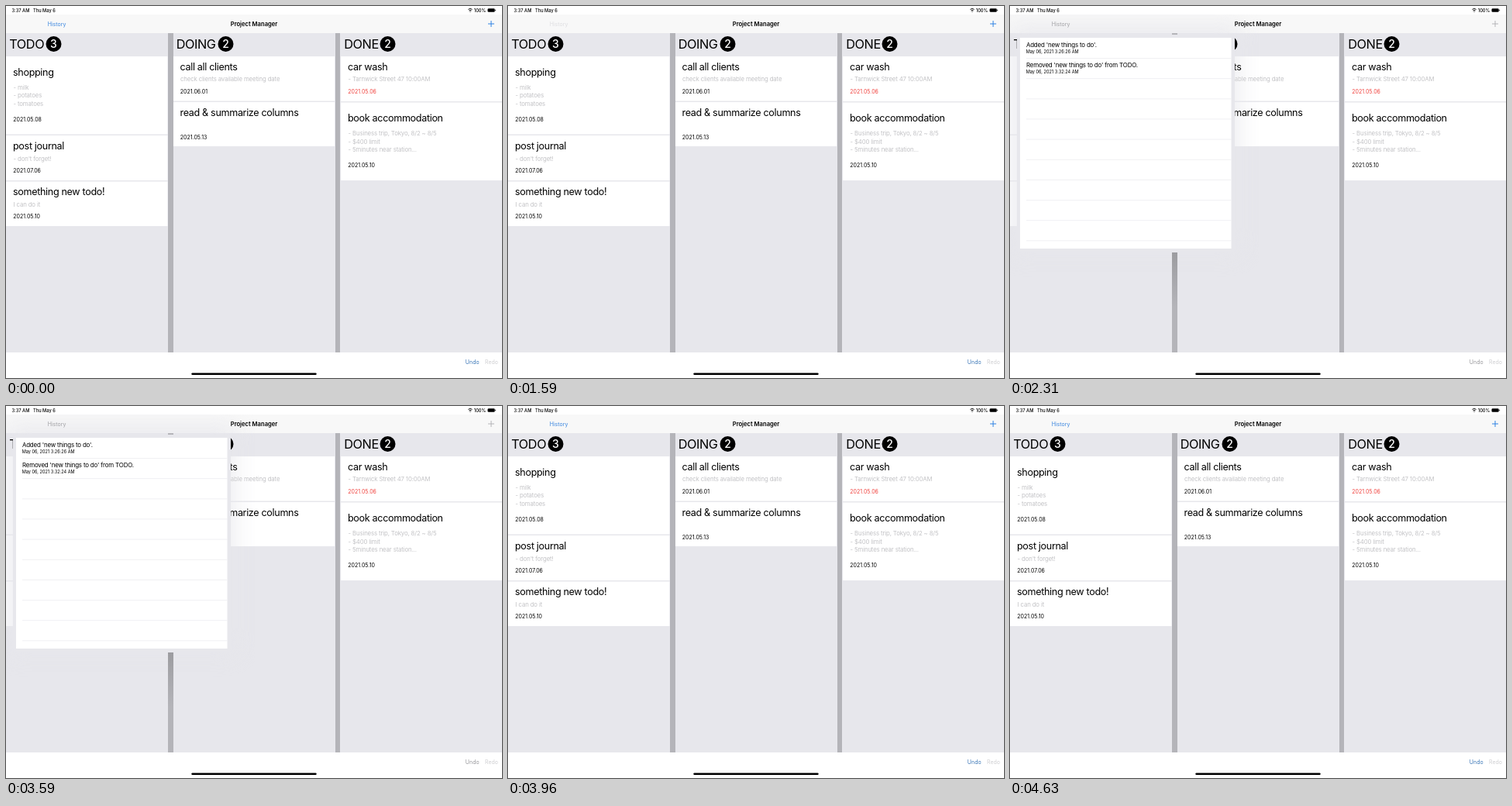
Recreate the animation shown at these times as an HTML page. Size 640 by 480 pixels, loop 5000 ms.

```html
<!DOCTYPE html>
<html lang="en">
<head>
<meta charset="utf-8">
<title>Project Manager</title>
<style>
  html, body { margin: 0; width: 100%; height: 100%; overflow: hidden; background: #fff; }
  svg { display: block; width: 640px; height: 480px; font-family: Inter, Roboto, sans-serif; }
  .head { font-size: 16.3px; letter-spacing: -.45px; }
  .count { font-size: 14px; font-weight: 500; fill: #fff; text-anchor: middle; }
  .title { font-size: 12.6px; letter-spacing: -.34px; }
  .note { font-size: 7.8px; letter-spacing: -.14px; fill: #c3c3c6; }
  .small { font-size: 7px; }
  .bar { font-size: 7.6px; font-weight: 600; text-anchor: middle; }
  .status { font-size: 5.7px; font-weight: 500; }
  .entry { font-size: 7.9px; letter-spacing: -.16px; }
  .stamp { font-size: 5.6px; }
  .shade { mix-blend-mode: darken; }
</style>
</head>
<body>
<svg id="stage" viewBox="0 0 640 480">
  <defs>
    <filter id="blur" x="-20%" y="-20%" width="140%" height="140%" color-interpolation-filters="sRGB">
      <feGaussianBlur stdDeviation="14"/>
    </filter>
    <linearGradient id="fade" x2="0" y2="1">
      <stop stop-color="#9c9ca0"/>
      <stop offset="1" stop-color="#b4b4b9"/>
    </linearGradient>
    <clipPath id="below"><path d="M0 11H640V447H0Z"/></clipPath>
  </defs>
  <path d="M0 0H640V480H0Z" fill="#fff"/>
  <path d="M0 11H640V35H0Z" fill="#f8f8f8"/>
  <path d="M0 35H640V447H0Z" fill="#e7e7ec"/>
  <g id="board"></g>
  <path d="M209 35h7V447h-7ZM425 35h6V447h-6Z" fill="#b4b4b9"/>
  <g id="popover">
    <g class="shade" clip-path="url(#below)">
      <rect x="0" y="24" width="296" height="294" fill="#e7e7ec" opacity=".75" filter="url(#blur)"/>
    </g>
    <path d="M209 318h7v70h-7Z" fill="url(#fade)"/>
    <g id="panel">
      <rect x="9" y="37" width="281" height="281" rx="5" fill="#e7e7ec"/>
      <path d="M13 41H285.5V313H13Z" fill="#fff"/>
    </g>
  </g>
  <g id="chrome">
    <path d="M596.4 4.4Q599 2.2 601.6 4.4M597.5 5.9Q599 4.7 600.5 5.9" fill="none" stroke="#000" stroke-width=".9"/>
    <circle cx="599" cy="7.1" r=".7"/>
    <rect x="621.5" y="3.2" width="9.2" height="4.6" rx="1.3"/>
    <path d="M631.3 4.7h.8v1.6h-.8Z"/>
    <path id="plus" d="M622 23h8M626 19v8" stroke-width="1"/>
    <rect x="239.3" y="473.6" width="161.4" height="2.4" rx="1.2"/>
  </g>
</svg>
<script>
const $ = id => document.getElementById(id);

function add(parent, tag, attrs, text = '') {
  const el = document.createElementNS('http://www.w3.org/2000/svg', tag);
  for (const k in attrs) el.setAttribute(k, attrs[k]);
  el.textContent = text;
  parent.append(el);
  return el;
}
const write = (parent, cls, x, y, text, fill) =>
  add(parent, 'text', fill ? { class: cls, x, y, fill } : { class: cls, x, y }, text);

// Each card: top, bottom, title y, title, first note y, notes, date y, date, date colour
const columns = [
  { name: 'TODO', x: 0, badge: 61.5, cards: [
    [65, 165.5, 90, 'shopping', 108, ['- milk', '- potatoes', '- tomatoes'], 149, '2021.05.08'],
    [167, 225, 185, 'post journal', 199.5, ["- don't forget!"], 215, '2021.07.06'],
    [226.5, 284, 244, 'something new todo!', 258.5, ['I can do it'], 274, '2021.05.10']] },
  { name: 'DOING', x: 215.5, badge: 283.5, cards: [
    [65, 122.5, 82.5, 'call all clients', 96.5, ['check clients available meeting date'], 112.5, '2021.06.01'],
    [124, 181, 141.5, 'read & summarize columns', 0, [], 171.5, '2021.05.13']] },
  { name: 'DONE', x: 432, badge: 492.5, cards: [
    [65, 123, 82.5, 'car wash', 96.5, ['- Tarnwick Street 47 10:00AM'], 112.5, '2021.05.06', '#f0403c'],
    [124.5, 225, 149, 'book accommodation', 167.3,
      ['- Business trip, Tokyo, 8/2 ~ 8/5', '- $400 limit', '- 5minutes near station...'], 207.7, '2021.05.10']] }
];

const board = $('board'), panel = $('panel'), chrome = $('chrome');
for (const { name, x, badge, cards } of columns) {
  write(board, 'head', x + 4.3, 55, name);
  add(board, 'circle', { cx: badge, cy: 49, r: 10 });
  write(board, 'count', badge, 54, cards.length);
  for (const [top, bottom, titleY, title, noteY, notes, dateY, date, color] of cards) {
    add(board, 'rect', { x, y: top, width: 208.5, height: bottom - top, fill: '#fff' });
    write(board, 'title', x + 9, titleY, title);
    notes.forEach((note, i) => write(board, 'note', x + 9.5, noteY + i * 10.4, note));
    write(board, 'small', x + 9.3, dateY, date, color);
  }
}

for (let i = 0; i < 10; i++)
  add(panel, 'path', { d: `M21 ${67.5 + i * 26.15}H285.5`, stroke: '#ededf0', 'stroke-width': .8 });
[["Added 'new things to do'.", 'May 06, 2021 3:26:26 AM'],
 ["Removed 'new things to do' from TODO.", 'May 06, 2021 3:32:24 AM']].forEach(([entry, stamp], i) => {
  write(panel, 'entry', 20.9, 52.6 + i * 26.2, entry);
  write(panel, 'stamp', 20.7, 61 + i * 26.2, stamp);
});

write(chrome, 'status', 7.5, 7.6, '3:37 AM');
write(chrome, 'status', 35, 7.6, 'Thu May 6');
write(chrome, 'status', 603.8, 7.6, '100%');
write(chrome, 'bar', 320, 25.7, 'Project Manager');
const historyLink = write(chrome, 'small', 53.7, 25.5, 'History');
const undo = write(chrome, 'small', 592.8, 461.5, 'Undo');
write(chrome, 'small', 618, 461.5, 'Redo', '#cfcfd2');

function draw(t) {
  const open = t >= 1930 && t < 3960;
  const pressed = t >= 1590 && t < 1930;
  historyLink.setAttribute('fill', open ? '#a0a0a4' : pressed ? '#dedee1' : '#3a86df');
  undo.setAttribute('fill', open ? '#98989c' : '#3d78b8');
  $('plus').setAttribute('stroke', open ? '#b4b4b8' : '#2f82e4');
  $('popover').setAttribute('visibility', open ? 'visible' : 'hidden');
  panel.setAttribute('opacity', t >= 3700 ? .89 : 1);
}

const start = performance.now();
(function tick() {
  draw((performance.now() - start) % 5000);
  requestAnimationFrame(tick);
})();
</script>
</body>
</html>
```
